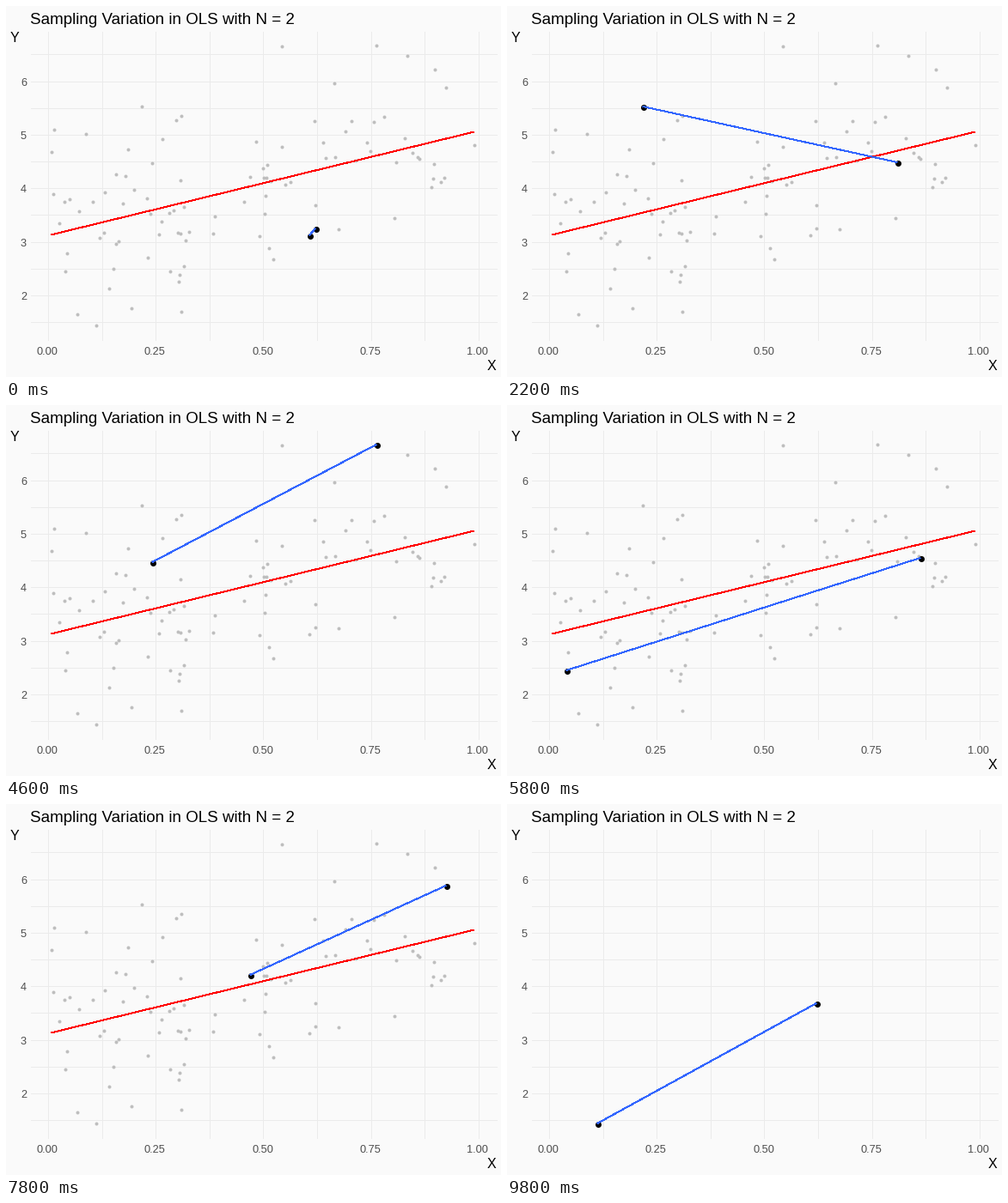
A matplotlib script for the animation above (10000 ms loop, 576x432 px).

```python
import math
import random

import matplotlib.pyplot as plt
import numpy as np
from matplotlib.animation import FuncAnimation

W, H, DPI = 576, 432, 72
FRAMES, STEP = 50, 200
N = 2 * FRAMES

plt.rcParams["font.family"] = "Liberation Sans"


def make_rng(seed):
    """Mersenne Twister whose state is filled by a congruential generator."""
    words = []
    for _ in range(675):
        seed = (69069 * seed + 1) % 2**32
        words.append(seed)
    rng = random.Random()
    rng.setstate((3, (*words[-624:], 624), None))
    return lambda: rng.getrandbits(32) / 2**32


def normal_quantile(p):
    lo, hi = -8.0, 8.0
    for _ in range(50):
        mid = (lo + hi) / 2
        if 0.5 * (1 + math.erf(mid / math.sqrt(2))) < p:
            lo = mid
        else:
            hi = mid
    return lo


def normal(uniform):
    big = 2**27
    coarse = int(big * uniform())
    return normal_quantile((coarse + uniform()) / big)


def px(v):
    return 48.2 + 500.6 * v


def py(v):
    return 460.6 - 62.33 * v


# Population: y = 3 + 2x + standard normal noise
uniform = make_rng(1234)
x = np.array([uniform() for _ in range(N)])
y = 3 + 2 * x + np.array([normal(uniform) for _ in range(N)])
dot_x, dot_y = np.round(px(x)), np.round(py(y))

fig = plt.figure(figsize=(W / DPI, H / DPI), dpi=DPI, facecolor="#FAFAFA")
ax = fig.add_axes([0, 0, 1, 1])
ax.axis("off")
ax.set_xlim(-0.5, W - 0.5)
ax.set_ylim(H - 0.5, -0.5)

grid = dict(color="#EBEBEB", lw=1, aa=False, solid_capstyle="butt")
for k in range(9):
    ax.plot([round(px(k / 8))] * 2, [29, 388], **grid)
for k in range(3, 14):
    ax.plot([28, 570], [round(py(k / 2))] * 2, **grid)

ax.text(28, 20.5, "Sampling Variation in OLS with N = 2", size=18.7)
ax.text(569.5, 424, "X", size=16, ha="right")
ax.text(4, 42, "Y", size=16)
tick = dict(size=12.8, color="#4D4D4D")
for k in range(5):
    ax.text(px(k / 4) - 0.5, 405, f"{k / 4:.2f}", ha="center", **tick)
for v in range(2, 7):
    ax.text(23.5, py(v) + 5.6, str(v), ha="right", **tick)

line = dict(lw=1, aa=False, solid_capstyle="butt")
cloud, = ax.plot(dot_x - 0.5, dot_y - 0.5, "o", ms=4, mew=0, color="#BEBEBE")
slope, intercept = np.polyfit(x, y, 1)
ends = np.array([x.min(), x.max()])
trend, = ax.plot(px(ends) - 0.5, py(intercept + slope * ends) - 0.5,
                 color="#FF0000", **line)
dots, = ax.plot([], [], "o", ms=7, mew=0, color="black")
fit, = ax.plot([], [], color="#3366FF", **line)


def update(i):
    # Each step takes the next two points; the first pair closes the loop
    pair = (i + 1) % FRAMES
    pick = slice(2 * pair, 2 * pair + 2)
    dots.set_data(dot_x[pick], dot_y[pick])
    fit.set_data(dot_x[pick] - 0.5, dot_y[pick] - 0.5)
    for part in (cloud, trend):
        part.set_visible(pair > 0)
    return cloud, trend, dots, fit


anim = FuncAnimation(fig, update, frames=FRAMES, interval=STEP, repeat=True,
                     repeat_delay=0, init_func=lambda: update(0))
plt.show()
```
